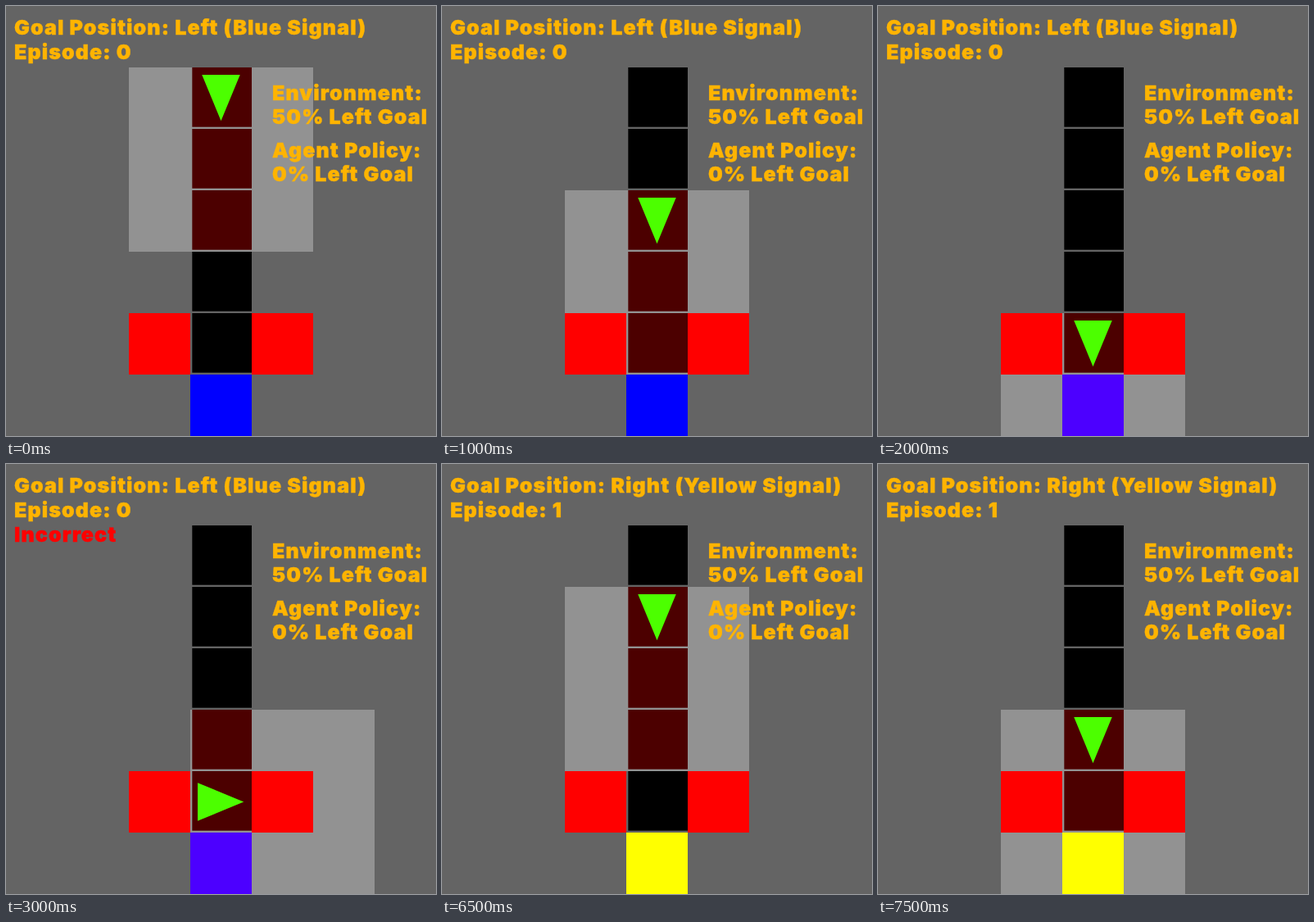
Write an HTML page that moves like this. It is 525 by 525 pixels and loops after 8000 ms.

```html
<!DOCTYPE html>
<html lang="en">
<head>
<meta charset="utf-8">
<title>Grid agent</title>
<style>
  html, body { margin: 0; width: 100%; height: 100%; overflow: hidden; background: #646464; }
  svg { display: block; width: 525px; height: 525px; }
  text {
    font: 900 25px Inter, sans-serif;
    letter-spacing: 1.12px;
    fill: #ffb400;
    stroke: #ffb400;
    stroke-width: .4px;
  }
  #verdict { fill: #f00; stroke: #f00; }
</style>
</head>
<body>
<svg viewBox="0 0 525 525">
  <g id="grid"></g>
  <path id="agent" fill="#4cff00" d="M-28.5 -23.25 L27.75 0 L-28.5 23.25 Z"/>
  <text id="goal" x="10" y="35"></text>
  <text id="episode" x="10" y="65"></text>
  <text id="verdict" x="10" y="95">Incorrect</text>
  <text x="325" y="115">Environment:</text>
  <text x="325" y="144">50% Left Goal</text>
  <text x="325" y="185">Agent Policy:</text>
  <text x="325" y="214">0% Left Goal</text>
</svg>
<script>
const CELL = 75, LINE = 2.33, LOOP = 8000;
const DOWN = 90, RIGHT = 0;
const WALL = ['#646464', '#929292'];
const FLOOR = ['#000', '#4c0000'];
const RED = ['#f00', '#f00'];

const EPISODES = [
  { goal: 'Left (Blue Signal)', signal: ['#00f', '#4c00ff'] },
  { goal: 'Right (Yellow Signal)', signal: ['#ff0', '#ff0'] }
];

// start time, episode, agent row, heading, verdict shown
const STEPS = [
  [0, 0, 1, DOWN], [500, 0, 2, DOWN], [1000, 0, 3, DOWN], [1500, 0, 4, DOWN],
  [2000, 0, 5, DOWN], [2500, 0, 5, RIGHT], [3000, 0, 5, RIGHT, true],
  [6000, 1, 1, DOWN], [6500, 1, 2, DOWN], [7000, 1, 3, DOWN], [7500, 1, 4, DOWN]
];

const $ = id => document.getElementById(id);

const rect = (x, y, w, h, fill) =>
  `<rect x="${x}" y="${y}" width="${w}" height="${h}" fill="${fill}"/>`;

function drawCell(col, row, lit, signal) {
  const x = col * CELL, y = row * CELL;
  const isFloor = col === 3 && row >= 1 && row <= 5;
  let paint = WALL;
  if (col === 3 && row === 6) paint = signal;
  else if (row === 5 && (col === 2 || col === 4)) paint = RED;
  let out = rect(x, y, CELL, CELL, paint[lit]);
  if (isFloor) out += rect(x + LINE, y, CELL - LINE, CELL - LINE, FLOOR[lit]);
  return out;
}

function draw([, ep, row, heading, verdict]) {
  const { goal, signal } = EPISODES[ep];
  // the agent sees a 3 by 3 block ahead of it
  const left = heading === DOWN ? 2 : 3;
  const top = heading === DOWN ? row : row - 1;
  let cells = '';
  for (let r = 0; r < 7; r++) {
    for (let c = 0; c < 7; c++) {
      const lit = c >= left && c < left + 3 && r >= top && r < top + 3;
      cells += drawCell(c, r, +lit, signal);
    }
  }
  $('grid').innerHTML = cells;
  $('agent').setAttribute('transform',
    `translate(${3.5 * CELL} ${(row + .5) * CELL}) rotate(${heading})`);
  $('goal').textContent = 'Goal Position: ' + goal;
  $('episode').textContent = 'Episode: ' + ep;
  $('verdict').style.display = verdict ? '' : 'none';
}

let shown;
const start = performance.now();

function tick() {
  const t = (performance.now() - start) % LOOP;
  const step = STEPS.filter(s => s[0] <= t).pop();
  if (step !== shown) draw(shown = step);
  requestAnimationFrame(tick);
}
tick();
</script>
</body>
</html>
```
